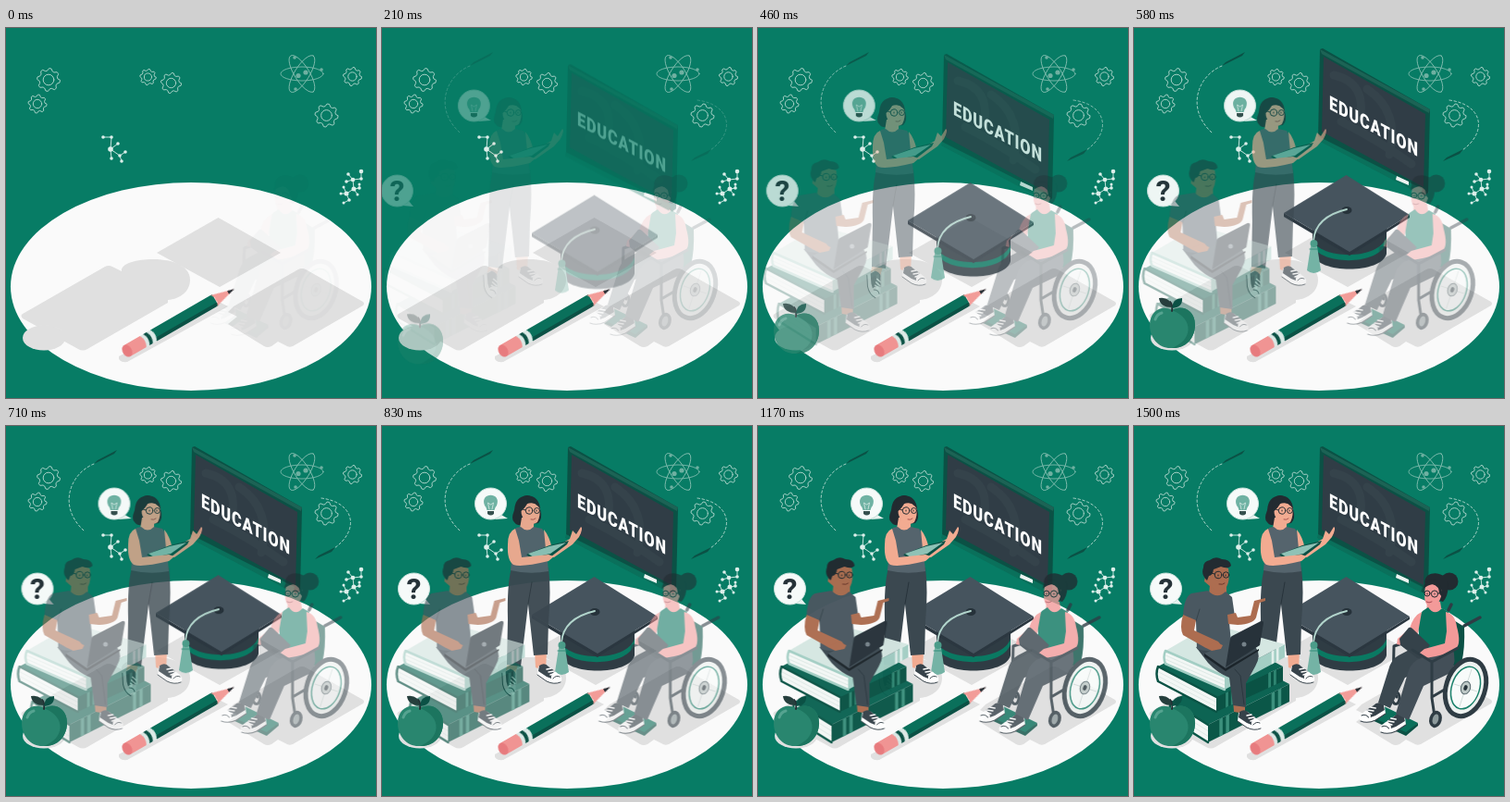
An HTML page for the animation above (1.54 s loop, 400x400 px).

```html
<!DOCTYPE html>
<html lang="en">
<head>
<meta charset="utf-8">
<title>Education</title>
<style>
html, body { margin: 0; width: 100%; height: 100%; overflow: hidden; background: #077c65; }
svg { display: block; width: 100vw; height: 100vh; }
.in { animation: 1540ms linear infinite both; }
.board { animation-name: rise; }
.apple { animation-name: rise; }
.cap { animation-name: bounce; }
.bubble { animation-name: glide; }
.dash { animation-name: appear; }
.teacher { animation-name: teacher; }
.student { animation-name: student; }
.chair { animation-name: chair; }
@keyframes rise {
  0%, 3% { opacity: 0; transform: translateY(24px); }
  21.4% { opacity: .5; transform: translateY(12.5px); }
  37.7%, 100% { opacity: 1; transform: none; }
}
@keyframes bounce {
  0%, 3% { opacity: 0; transform: translateY(24px); }
  21.4% { opacity: .57; transform: translateY(13px); }
  37.7% { opacity: 1; transform: translateY(-4px); }
  53.5%, 100% { opacity: 1; transform: none; }
}
@keyframes glide {
  0%, 3% { opacity: 0; transform: translateX(-24px); }
  21.4% { opacity: .52; transform: translateX(-14px); }
  37.7% { opacity: .97; transform: translateX(-3px); }
  48%, 100% { opacity: 1; transform: none; }
}
@keyframes appear {
  0%, 3% { opacity: 0; }
  38%, 100% { opacity: 1; }
}
@keyframes teacher {
  0%, 8% { opacity: 0; transform: translateX(-24px); }
  56%, 100% { opacity: 1; transform: none; }
}
@keyframes student {
  0%, 12% { opacity: 0; transform: translateX(-24px); }
  77.5%, 100% { opacity: 1; transform: none; }
}
@keyframes chair {
  0% { opacity: .03; transform: translateX(-23.4px); }
  97.4%, 100% { opacity: 1; transform: none; }
}
.line { fill: none; stroke-linecap: round; stroke-linejoin: round; }
.peach { fill: #f2ab91; } .pink { fill: #f39a99; } .brown { fill: #ad6d50; }
.ink { fill: #222b31; } .slate { fill: #3b4850; }
.deep { fill: #0b5145; } .green { fill: #0a705b; }
</style>
</head>
<body>
<svg viewBox="0 0 400 400">
<defs>
  <g id="shoe">
    <path d="M-11-8Q-4-12 0-8L12 1Q16 5 13 9Q6 12-2 8L-12 1Z" fill="#fff"/>
    <path d="M-10-9Q-4-13 0-8L7-3Q2 1 3 5L-2 3L-11-3Z" fill="#36424a"/>
    <path class="line" d="M-12 1L-2 8Q6 12 13 9M5 5Q8 1 12 3" stroke="#36424a"/>
    <path class="line" d="M-2-5L3-6M0-2L6-3M2 1L8-1" stroke="#fff" stroke-width="1.400"/>
  </g>
</defs>
<rect width="400" height="400" fill="#077c65"/>
<ellipse cx="200" cy="279.5" rx="195" ry="112.5" fill="#fafafa"/>

<g fill="#e0e0e0">
  <path d="M18 309L107 258Q111 256 115 258L125 263C124 254 142 250 159 250C184 250 199 259 199 272C199 285 188 293 175 294V297L88 347Q83 350 78 347L18 314Q15 311 18 309Z"/>
  <ellipse cx="41" cy="335" rx="23" ry="13.5"/>
  <path d="M229.500 205L297 243L231 280L163 243Z"/>
  <path d="M246 301L316 261Q320 259 324 261L386 296Q388 298 386 300L310 344Q306 346 302 343L294 339L287 344Q283 346 279 344L240 320L250 312L240 307Z"/>
  <path d="M122 355Q121 362 131 361L240 301L230 296Z"/>
</g>

<g id="doodles" class="line" stroke="#a5d0c5" stroke-width="1"></g>
<g class="line" stroke="#8cc2b5" stroke-width=".8">
  <ellipse cx="320" cy="49.500" rx="23" ry="7.500"/>
  <ellipse cx="320" cy="49.500" rx="23" ry="8" transform="rotate(58 320 49.500)"/>
  <ellipse cx="320" cy="49.500" rx="23" ry="8" transform="rotate(-58 320 49.500)"/>
</g>
<g fill="#6fb0a1">
  <circle cx="312" cy="32" r="1.800"/><circle cx="341" cy="45" r="1.800"/><circle cx="313" cy="66" r="1.800"/>
  <circle cx="316" cy="51.500" r="2.600"/><circle cx="324" cy="48" r="2.600"/>
</g>
<g id="molecules" class="line" stroke="#dcefea" stroke-width=".9"></g>

<g class="in dash">
  <path class="line" d="M95 41C70 51 55 86 84 113M341 78C378 83 382 113 355 132" stroke="#a9d3c8" stroke-dasharray="2.500 2.500"/>
  <path class="deep" d="M95 41L99 37L120 26L117 30ZM334 144L338 140L356 131L352 136Z"/>
</g>

<g class="in board">
  <path class="deep" d="M201 23L204 22L320 88L318 178L314 181L199 121Z"/>
  <path d="M201 23L320 88L319 92L203 28Z" fill="#1c6355"/>
  <path d="M205 31L315 93L313 172L203 112Z" fill="#303d46"/>
  <path class="line" d="M216 51Q252 59 244 99M252 66Q288 90 276 137M224 101Q265 122 300 147" stroke="#35434b" stroke-width="9"/>
  <path class="green" d="M199 117L312 174L310 180L198 121Z"/>
  <path d="M284 160L297 166V170L283 164Z" fill="#eef4f2"/>
  <text transform="matrix(.78 .42 0 1 211 87.500)" font-family="Roboto, Arial, sans-serif" font-weight="900" font-size="21" letter-spacing="1" fill="#fff">EDUCATION</text>
</g>

<g class="in cap">
  <path d="M193 220V248C198 270 268 270 273 248V218Z" fill="#2f3c44"/>
  <path d="M193 233C201 254 264 256 273 230V236C264 262 201 260 193 239Z" fill="#0a7962"/>
  <path d="M162 204L233 246L298 206V209L233 250L162 208Z" fill="#2b3740"/>
  <path d="M229.500 163L298 206L233 246L162 204Z" fill="#46545e"/>
  <ellipse cx="230" cy="201" rx="5.500" ry="4" fill="#26323a"/>
  <path class="line" d="M230 200Q196 208 194 234" stroke="#b2d5cc" stroke-width="1.800"/>
  <path d="M191 240L187 266Q194 272 202 266L198 240Z" fill="#74b3a5"/>
  <circle cx="194.500" cy="237" r="4" fill="#4b9c89"/>
  <path class="line" d="M190 243H199" stroke="#318c78"/>
</g>

<g class="in teacher">
  <path class="peach" d="M137 254L149 255L144 271L134 269ZM166 243L179 243L178 265L167 261Z"/>
  <g transform="translate(139 276) rotate(52)"><use href="#shoe"/></g>
  <use href="#shoe" transform="translate(181 268)"/>
  <path class="slate" d="M141 153L181 153Q184 178 181 211L180 247L165 248L159 193L151 260L136 258L137 209Q136 172 141 153Z"/>
  <path class="line" d="M159 192L163 169" stroke="#27333b"/>
  <path class="ink" d="M144 104Q140 101 144 91Q145 76 158 75Q170 77 172 90Q175 100 170 105L152 107Q147 108 144 104Z"/>
  <path class="peach" d="M152 99H165V112Q157 118 150 111Z"/>
  <path d="M146 110L151 109Q158 116 165 109L174 111Q181 119 179 136L181 157Q160 161 140 156L142 135Q139 119 146 110Z" fill="#55646d"/>
  <path class="peach" d="M152 87Q162 80 171 86Q173 96 169 104Q162 109 155 102Q150 95 152 87Z"/>
  <path class="ink" d="M150 93Q156 89 159 82Q167 82 172 90Q171 76 158 75Q146 77 150 93Z"/>
  <g class="line" stroke="#222b31">
    <circle cx="160" cy="91.500" r="3.700"/><circle cx="168.500" cy="91.500" r="3"/>
    <path d="M156 91L151 89M160 91V92M168 91V92"/>
  </g>
  <path class="line" d="M162 101Q165 102 167 100" stroke="#a95750"/>
  <path class="peach" d="M176 112Q182 119 185 133L204 122L207 113L211 117L216 109Q219 110 214 120L207 128L187 142Q180 142 178 133Z"/>
  <path class="deep" d="M157 139L182 129L203 124L201 128L184 141L164 144Z"/>
  <path d="M159 138L182 130L200 126L183 138L165 142Z" fill="#8fc2b6"/>
  <path class="peach" d="M145 111Q137 114 137 128Q136 145 143 150Q152 153 181 146L187 141L181 139L152 142L149 124Z"/>
</g>

<g class="in bubble">
  <path d="M47 187L52 193L40 192Z" fill="#e8f2ef"/>
  <circle cx="34.500" cy="176" r="17" fill="#f6faf9" stroke="#c8e0da"/>
  <text x="34.500" y="187" text-anchor="middle" font-family="Roboto, Arial, sans-serif" font-size="32" font-weight="700" fill="#263238">?</text>
  <path d="M129 96L136 100L122 101Z" fill="#e8f2ef"/>
  <circle cx="117.500" cy="84" r="17" fill="#f6faf9" stroke="#c8e0da"/>
  <path d="M113.500 91Q113 88 111 86C105 71 130 71 124 86Q122 88 121.500 91Z" fill="#6fb2a3"/>
  <path class="line" d="M116 90L114.500 83L117.500 85L120.500 83L119 90" stroke="#d9ebe6" stroke-width=".8"/>
  <path d="M114 92H121V95Q117.500 98 114 95Z" fill="#36504e"/>
</g>

<g class="in student">
  <g id="books"></g>
  <path class="brown" d="M107 295L120 298L120 311L108 309Z"/>
  <use href="#shoe" transform="translate(124 318)"/>
  <path class="slate" d="M67 239L101 229L132 240Q138 248 131 260L121 278L121 304L107 302L103 272Q90 267 80 256Z"/>
  <path class="line" d="M109 263L115 270L119 301" stroke="#2b373f"/>
  <path class="brown" d="M82 172H100V183Q91 189 81 182Z"/>
  <path d="M62 181L80 178Q90 188 99 179L106 185L109 206L103 212L105 235Q86 247 68 241L67 211L53 205Q54 185 62 181Z" fill="#4a5861"/>
  <path class="line" d="M67 211L71 198" stroke="#36434b"/>
  <path class="brown" d="M53 204L67 210L65 221L91 233L96 239L88 242L76 239L53 226Q49 218 53 204Z"/>
  <path class="brown" d="M101 204L110 202L112 207L126 205L130 189L142 186L142 189L136 191L132 207Q129 214 112 215L102 214Z"/>
  <path class="brown" d="M78 156Q88 147 102 154Q104 167 100 174Q92 181 83 174L76 168Z"/>
  <path class="ink" d="M79 167Q72 161 75 153Q75 146 82 145Q88 140 95 144Q104 144 105 151Q102 155 94 152L86 155Q85 162 81 162Z"/>
  <g class="line" stroke="#20292f">
    <circle cx="91" cy="161" r="3.800"/><circle cx="99.500" cy="161" r="3.200"/><path d="M87 160L81 158M91 161V162M99 161V162"/>
  </g>
  <path class="line" d="M92 171Q96 172 98 170" stroke="#6d372c"/>
  <path d="M76 246L104 234L127 242L99 262Z" fill="#4b5961"/>
  <path d="M76 246L99 262L135 241V243L99 265L76 249Z" fill="#1c252b"/>
  <path d="M104 230Q104 228 106 227L137 211Q140 210 140 213L136 237L99 261Z" fill="#27323a"/>
  <circle cx="119" cy="236" r="2.500" fill="#76838a"/>
  <path class="brown" d="M76 239L87 233L96 237L94 241L84 243Z"/>
</g>

<g class="in apple">
  <path d="M41 305C50 299 66 303 66 321C66 337 54 347 41 346C28 347 17 336 17 321C17 305 31 299 41 305Z" fill="#29866f"/>
  <path d="M41 305C50 299 66 303 66 321C66 337 54 347 41 346C63 338 66 315 41 305Z" fill="#1c755f"/>
  <path class="line" d="M23 315Q25 309 30 308" stroke="#55a390" stroke-width="3"/>
  <path class="line" d="M41 306Q42 299 39 296" stroke="#222b31" stroke-width="1.800"/>
  <path d="M41 302Q28 302 27 292Q39 290 41 302Z" fill="#263f3d"/>
  <path d="M41 303Q42 292 52 292Q53 302 41 303Z" class="deep"/>
</g>

<g transform="translate(131 349) rotate(-30)">
  <path d="M0-7H22V7H0Z" fill="#f09493"/>
  <ellipse rx="5" ry="7" fill="#e77b7e"/>
  <path d="M20-7H36V7H20Q24 0 20-7Z" fill="#dbe9e6"/>
  <path class="deep" d="M24-7H28Q32 0 28 7H24Q28 0 24-7Z"/>
  <path class="green" d="M33-7H110V7H33Q37 0 33-7Z"/>
  <path class="deep" d="M35 3H110V7H33Z"/>
  <path d="M108-7Q112-2 110 0Q112 4 108 7L133 0Z" fill="#f29c98"/>
  <path class="ink" d="M126-2L134 0L126 2Z"/>
</g>

<g class="in chair">
  <g class="line" stroke="#2f3d45">
    <ellipse cx="283" cy="294" rx="4" ry="6.500" stroke-width="3"/>
    <path d="M340 199L343 193M357 216L374 207" stroke-width="3.500"/>
    <path d="M281 238L280 282L284 293M281 238L296 233" stroke-width="3"/>
  </g>
  <path class="deep" d="M344 209L357 217Q358 241 354 256L321 269L289 253L302 241L343 244Z"/>
  <path class="green" d="M253 313L266 301L307 321L294 333Z"/>
  <path class="deep" d="M253 313L294 331L307 321V324L294 335L253 316Z"/>
  <use href="#shoe" transform="matrix(-1.080 0 0 1 259 310)"/>
  <use href="#shoe" transform="matrix(-1.080 0 0 1 281 322)"/>
  <path class="slate" d="M311 235L286 248Q278 252 275 264L264 299L277 305L293 272L326 262Z"/>
  <path d="M344 239L313 250Q299 254 296 267L283 311L297 318L313 281L342 267Q350 254 344 239Z" fill="#434f58"/>
  <path class="pink" d="M317 190H331L333 202Q325 209 316 201Z"/>
  <path d="M312 200L318 196Q325 206 333 197L340 201L338 220L345 241Q325 252 304 241L308 224Q304 209 312 200Z" fill="#08745e"/>
  <circle class="ink" cx="341" cy="168" r="9.500"/>
  <path class="ink" d="M315 172C310 157 336 154 339 170Q341 182 334 190L321 186Z"/>
  <path class="pink" d="M315 173Q322 168 331 175Q335 179 331 187Q327 198 318 195Q312 189 315 173Z"/>
  <path class="ink" d="M313 176Q314 164 327 167Q334 172 333 185L330 181Q330 173 323 171Q317 172 313 176Z"/>
  <g class="line" stroke="#222b31">
    <circle cx="317" cy="181" r="3"/><circle cx="325" cy="181.500" r="3.600"/><path d="M329 181L333 180M317 181V182M325 181V182"/>
  </g>
  <path class="line" d="M316 190Q319 192 322 190" stroke="#a94b54"/>
  <path class="pink" d="M311 201Q302 205 298 219L285 230L284 236L294 238L307 224Z"/>
  <path d="M287 230L297 218Q299 217 301 219L320 237L310 251Q307 252 305 250L288 237Z" fill="#35424a"/>
  <path class="pink" d="M337 201Q347 203 349 217Q354 235 348 241Q337 248 315 251L308 246L314 241L336 235L338 222Z"/>
  <path class="line" d="M301 242L322 255L350 240M322 255V294L325 314M322 293L351 276" stroke="#2f3d45" stroke-width="3"/>
  <g transform="translate(358.500 283) rotate(18)">
    <ellipse rx="21" ry="31.500" fill="#eef2f0" stroke="#2f3c44" stroke-width="5"/>
    <ellipse rx="15" ry="23.500" fill="#f8fbfa" stroke="#19806a" stroke-width="1.500"/>
    <path class="line" d="M-13 0H13M0-21V21" stroke="#cdd8d5" stroke-width=".8"/>
    <ellipse rx="5" ry="7" fill="#bdc8c6" stroke="#53656a"/>
    <ellipse rx="2" ry="3" fill="#27343b"/>
  </g>
  <ellipse cx="326" cy="317" rx="5" ry="7.500" fill="#8d9a9c" stroke="#2f3c44" stroke-width="3.500" transform="rotate(15 326 317)"/>
</g>
</svg>
<script>
const add = (id, html) => { document.getElementById(id).innerHTML += html; };

function gear(x, y, r) {
  const rim = [];
  for (let i = 0; i < 32; i++) {
    const a = (i - .5) * Math.PI / 16 + .15;
    const d = i % 4 < 2 ? r : r * .8;
    rim.push((x + d * Math.cos(a)).toFixed(1) + ' ' + (y + d * Math.sin(a)).toFixed(1));
  }
  add('doodles', `<path d="M${rim.join('L')}Z"/><circle cx="${x}" cy="${y}" r="${r * .47}"/>`);
}
[[46, 56, 12.4], [34, 82, 10], [153.5, 53, 8.7], [178.5, 59.5, 11], [374.5, 52.5, 10], [346.5, 94.5, 12.5]]
  .forEach(g => gear(...g));

function molecule(chains, atoms) {
  add('molecules', `<path d="${chains}"/>` + atoms.map(([x, y, r = 1.8]) =>
    `<circle cx="${x}" cy="${y}" r="${r}" fill="#dcefea" stroke="none"/>`).join(''));
}
molecule('M105 118H114L113 131L121 125M114 141L113 131L123 138L129 134M123 138L125 144',
  [[105, 118], [114, 118], [113, 131, 2.8], [121, 125], [129, 134], [123, 138], [125, 144], [114, 141]]);
molecule('M384 155V163L375 164L370 158M368 166L375 164L376 174L382 173V169M376 174L380 180M376 174L368 179L365 172M362 179H368L371 186L365 189',
  [[384, 155, 2.3], [384, 163], [375, 164, 2.3], [370, 158], [368, 166], [376, 174, 2.5], [382, 173],
   [382, 169, 1.5], [380, 180, 1.5], [368, 179, 2.5], [365, 172, 1.5], [362, 179, 1.5], [371, 186], [365, 189, 1.5]]);

// left, back, right and front corners of the cover, then the thickness
function book(l, b, r, f, h, top, spine, band) {
  const at = (p, dy = 0) => `${p[0]} ${p[1] + dy}`;
  const mix = (k, dy) => `${f[0] + (r[0] - f[0]) * k} ${f[1] + (r[1] - f[1]) * k + dy}`;
  const stripe = k => `M${mix(k, 0)}L${mix(k + .04, 0)}L${mix(k + .04, h)}L${mix(k, h)}Z`;
  add('books', `<path d="M${at(l)}L${at(f)}V${f[1] + h}L${at(l, h)}Z" fill="#f3f7f5"/>
    <path class="line" d="M${at(l, h * .35)}L${at(f, h * .35)}M${at(l, h * .65)}L${at(f, h * .65)}" stroke="#d8e5e1" stroke-width=".8"/>
    <path d="M${at(f)}L${at(r)}V${r[1] + h}L${at(f, h)}Z" fill="${spine}"/>
    <path d="${stripe(.14)}${stripe(.22)}${stripe(.78)}${stripe(.86)}" fill="${band}"/>
    <path d="M${at(l)}L${at(b)}L${at(r)}L${at(f)}Z" fill="${top}"/>
    <path class="line" d="M${at(f)}L${at(l)}Q${l[0] - 3} ${l[1] + h / 2} ${at(l, h)}L${at(f, h)}" stroke="${spine}" stroke-width="2.5"/>`);
}
book([40, 298], [120, 254], [168, 279], [80, 323], 19, '#0d6453', '#0b5748', '#3c907d');
book([26, 260], [94, 224], [161, 260], [89, 293], 16, '#0d6453', '#0a5244', '#2e8571');
book([34, 243], [84, 214], [163, 236], [98, 271], 14, '#d5e7e2', '#a3cec4', '#e3f0ec');
</script>
</body>
</html>
```
